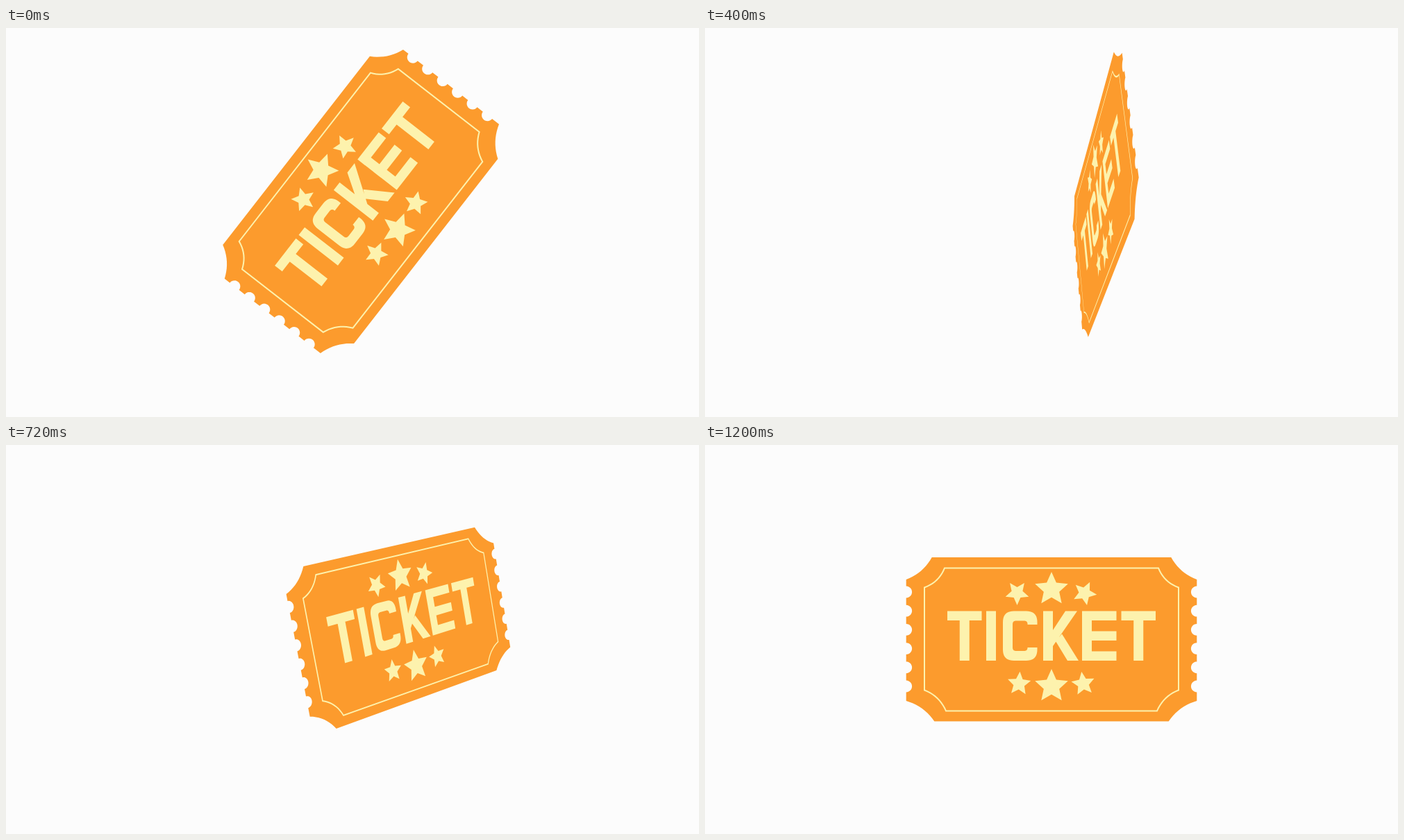
Write an HTML page with a canvas that moves like this. It is 998 px wide and 561 px high and loops after 2.52 s.

```html
<!DOCTYPE html>
<html lang="en">
<head>
<meta charset="utf-8">
<title>Spinning ticket</title>
<style>
  html, body { margin: 0; width: 100%; height: 100%; overflow: hidden; background: #fcfcfc; }
  canvas { display: block; width: 100vw; height: 100vh; }
</style>
</head>
<body>
<canvas id="stage" width="998" height="561" role="img" aria-label="TICKET"></canvas>
<script>
const ctx = document.getElementById('stage').getContext('2d');
const W = 998, H = 561, CX = W / 2, CY = H / 2;
const LOOP = 2520, STEP = 40, SETTLE = 1200, FOCAL = W * 50 / 36;
const ORANGE = '#fc9b2d', CREAM = '#fdf2ad', PAPER = '#fcfcfc';
const RAD = Math.PI / 180;

// Key points [ms, value]: turn about the upright axis, then the swing of the ticket
const spin = [[0, 0], [280, 298.4], [400, 442], [600, 620], [880, 720]];
const shift = [[0, 12.6], [120, 60], [400, 114], [480, 88], [600, 147], [880, 40], [1010, -23], [1120, 0]];
const lift = [[0, -31], [280, -28], [600, -15.5], [800, -27], [1010, 26], [1120, 0]];
const depth = [[0, 0], [120, -5], [280, -16], [400, 49], [800, 0]];

function slope(keys, i) {
  if (i === keys.length - 1) return 0;
  const a = keys[Math.max(i - 1, 0)], b = keys[i + 1];
  return (b[1] - a[1]) / (b[0] - a[0]);
}

// Smooth curve through the keys, coming to rest at the last one
function sample(keys, t) {
  const last = keys.length - 1;
  if (t >= keys[last][0]) return keys[last][1];
  let i = 0;
  while (t >= keys[i + 1][0]) i++;
  const [t0, a] = keys[i], [t1, b] = keys[i + 1];
  const d = t1 - t0, u = (t - t0) / d, w = 1 - u;
  return a * w * w * (1 + 2 * u) + b * u * u * (3 - 2 * u)
    + d * u * w * (w * slope(keys, i) - u * slope(keys, i + 1));
}

// cubic-bezier(1/6, 1/6, 2/3, 1)
function easeOut(x) {
  const curve = (s, p, q) => 3 * (1 - s) * s * ((1 - s) * p + s * q) + s ** 3;
  let lo = 0, hi = 1;
  for (let i = 0; i < 24; i++) {
    const mid = (lo + hi) / 2;
    if (curve(mid, 1 / 6, 2 / 3) < x) lo = mid; else hi = mid;
  }
  return curve(hi, 1 / 6, 1);
}

// Shapes, centred on the ticket
const mirror = pts => [...pts, ...pts.map(([x, y]) => [-x, y]).reverse()];
const box = (x, y, w, h) => [[x, y], [x + w, y], [x + w, y + h], [x, y + h]];

function quad(p, c, q, n = 10) {
  return Array.from({ length: n + 1 }, (_, i) => {
    const u = i / n, w = 1 - u;
    return [0, 1].map(k => w * w * p[k] + 2 * w * u * c[k] + u * u * q[k]);
  });
}

// Concave corner between two points of a clockwise outline
function bite(p, q) {
  const dx = q[0] - p[0], dy = q[1] - p[1], k = 9 / Math.hypot(dx, dy);
  return quad(p, [(p[0] + q[0]) / 2 - dy * k, (p[1] + q[1]) / 2 + dx * k], q);
}

// Half-round holes down the right side
function holes(x, r = 8.4, n = 14) {
  const pts = [];
  for (let y = -68.5; y < 70; y += 27.2) {
    for (let k = 0; k <= n; k++) {
      const a = Math.PI * k / n;
      pts.push([x - r * Math.sin(a), y - r * Math.cos(a)]);
    }
  }
  return pts;
}

// Moves every edge of a clockwise outline inward by d
function inset(pts, d) {
  const n = pts.length;
  const normal = (p, q) => {
    const len = Math.hypot(q[0] - p[0], q[1] - p[1]);
    return [(p[1] - q[1]) / len, (q[0] - p[0]) / len];
  };
  return pts.map((p, i) => {
    const a = normal(pts[(i + n - 1) % n], p), b = normal(p, pts[(i + 1) % n]);
    const m = d / (1 + a[0] * b[0] + a[1] * b[1]);
    return [p[0] + (a[0] + b[0]) * m, p[1] + (a[1] + b[1]) * m];
  });
}

// Open line with rounded corners
function rounded(pts, r) {
  const toward = (p, q) => {
    const k = r / Math.hypot(q[0] - p[0], q[1] - p[1]);
    return [p[0] + (q[0] - p[0]) * k, p[1] + (q[1] - p[1]) * k];
  };
  return pts.flatMap((p, i) => i === 0 || i === pts.length - 1
    ? [p] : quad(toward(p, pts[i - 1]), p, toward(p, pts[i + 1])));
}

function star(x, y, r, turn) {
  return Array.from({ length: 10 }, (_, i) => {
    const a = (turn + i * 36) * RAD, d = i % 2 ? r * 0.47 : r;
    return [x + d * Math.sin(a), y - d * Math.cos(a)];
  });
}

// Lettering built from bars
const TOP = -41, BASE = 30.5, TALL = BASE - TOP, STEM = 14, BAR = 13.5, WIDE = 49.5;
const stem = x => box(x, TOP, STEM, TALL);
const bar = (x, y) => box(x, y, WIDE, BAR);
const letterT = x => [bar(x, TOP), stem(x + (WIDE - STEM) / 2)];
const letterE = x => [stem(x), bar(x, TOP), bar(x, -12), bar(x, BASE - BAR)];
const letterK = x => [
  stem(x),
  [[x + 13, -12], [x + 32, TOP], [x + 49, TOP], [x + 13, 11]],
  [[x + 18, 2.5], [x + 27, -8], [x + 51, BASE], [x + 35, BASE]]
];
function letterC(x) {
  const hook = (d, r) => {
    const l = x + d, right = x + WIDE - d, t = TOP + d, b = BASE - d;
    return rounded([[right, -21.5], [right, t], [l, t], [l, b], [right, b], [right, 11.5]], r);
  };
  return [[...hook(0, 16), ...hook(STEM, 5).reverse()]];
}

const body = mirror([...bite([172.3, -118.5], [209.3, -86.5]), ...holes(209.3), ...bite([209.3, 88.5], [168.7, 118])]);
const rim = mirror([...bite([154, -103], [183, -75]), ...bite([183, 73], [152, 103])]);
const rimBand = [inset(rim, -1), inset(rim, 1).reverse()];
const marks = [
  ...letterT(-150), stem(-94), ...letterC(-70), ...letterK(-12), ...letterE(44), ...letterT(100.5),
  star(0, -72.5, 25, 0), star(-49.5, -67.2, 17.7, 36), star(47.7, -66.8, 17.7, 25),
  star(0, 67.5, 25, 0), star(-46.7, 63.8, 17.5, 4), star(45.7, 63.8, 17.5, -8)
];

function projector(t) {
  const turn = sample(spin, t) * RAD, tilt = -52.1 * (1 - easeOut(Math.min(t / SETTLE, 1))) * RAD;
  const dx = sample(shift, t), dy = sample(lift, t), dz = sample(depth, t);
  const cs = Math.cos(turn), ss = Math.sin(turn), ct = Math.cos(tilt), st = Math.sin(tilt);
  return ([u, v]) => {
    const x = u * ct - v * st + dx, y = u * st + v * ct + dy;
    const k = FOCAL / (FOCAL - ss * x + cs * dz);
    return [CX + (cs * x + ss * dz) * k, CY + y * k];
  };
}

function fill(shapes, color, project) {
  ctx.beginPath();
  for (const pts of shapes) {
    pts.forEach((p, i) => ctx[i ? 'lineTo' : 'moveTo'](...project(p)));
    ctx.closePath();
  }
  ctx.fillStyle = color;
  ctx.fill();
}

function draw(t) {
  const project = projector(t);
  ctx.fillStyle = PAPER;
  ctx.fillRect(0, 0, W, H);
  fill([body], ORANGE, project);
  fill(rimBand, CREAM, project);
  fill(marks, CREAM, project);
}

const start = performance.now();
function tick() {
  const t = (performance.now() - start) % LOOP;
  draw(Math.floor(t / STEP) * STEP);
  requestAnimationFrame(tick);
}
tick();
</script>
</body>
</html>
```
